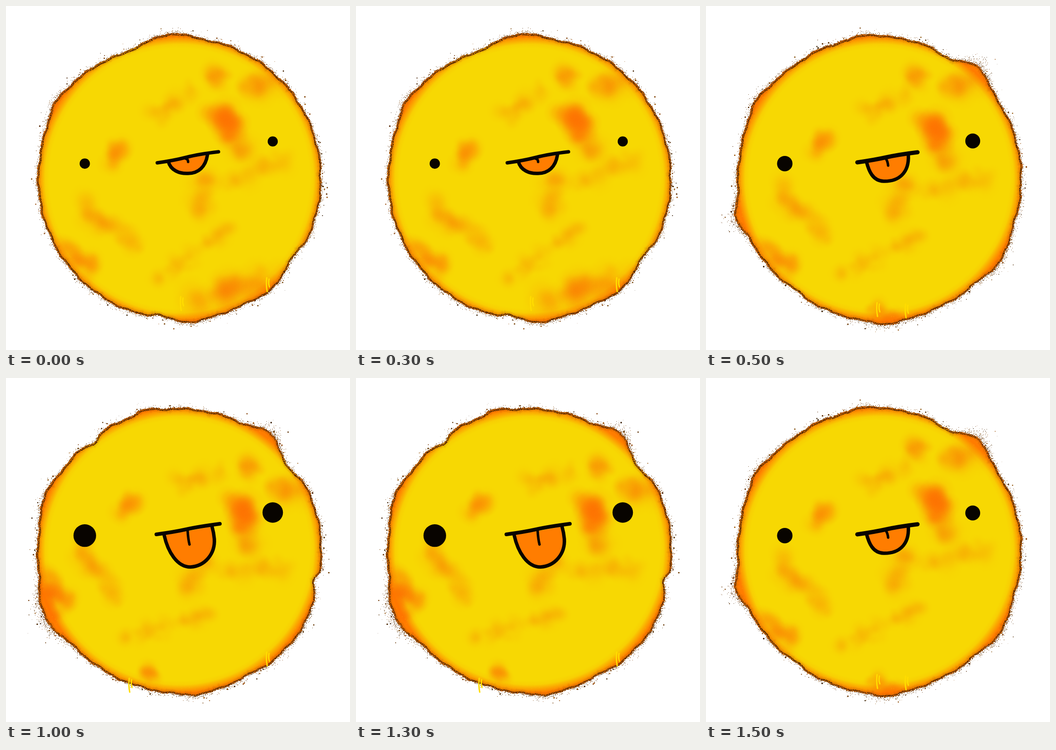
These frames come from a looping animation (748x748 px, 2000 ms). An HTML page with a canvas:

```html
<!DOCTYPE html>
<html lang="en">
<head>
<meta charset="utf-8">
<title>Sun face</title>
<style>
html, body { margin: 0; width: 100%; height: 100%; overflow: hidden; background: #fff; }
canvas { position: absolute; left: 0; top: 0; width: 748px; height: 748px; animation: 2s step-end infinite; }
#closed { animation-name: closed; }
#half { animation-name: half; }
#open { animation-name: open; }
@keyframes closed { 0% { visibility: visible } 25%, 100% { visibility: hidden } }
@keyframes half { 0%, 50% { visibility: hidden } 25%, 75%, 100% { visibility: visible } }
@keyframes open { 0%, 75%, 100% { visibility: hidden } 50% { visibility: visible } }
</style>
</head>
<body>
<canvas id="closed" width="748" height="748"></canvas>
<canvas id="half" width="748" height="748"></canvas>
<canvas id="open" width="748" height="748"></canvas>
<script>
const CX = 377, CY = 375, SIZE = 748, TAU = Math.PI * 2, RAD = Math.PI / 180;
const INK = '#080400', ORANGE = '#ff7d00';

// Smears run from one point to another: x0, y0, x1, y1, width, strength.
const surface = [
  [455, 244, 492, 254, 44, .9],
  [232, 326, 238, 302, 36, .42],
  [322, 242, 402, 182, 30, .2],
  [155, 432, 285, 515, 34, .27],
  [440, 365, 415, 465, 36, .23],
  [482, 485, 325, 595, 30, .2],
  [600, 328, 485, 385, 34, .18],
  [490, 265, 525, 330, 36, .2]
];
const border = [
  [448, 160, 470, 148, 32, .3],
  [525, 185, 575, 160, 40, .3],
  [125, 520, 185, 575, 34, .4]
];

// Bumps on the round edge: angle in degrees, height, width in degrees.
const poses = [
  {
    id: 'closed', seed: 11, turn: 0, rim: 0, radius: 309,
    bumps: [[37, -10, 5], [48, 6, 7], [84, 6, 5], [99, -8, 3], [212, 9, 7], [246, -9, 7], [267, 8, 5]],
    smears: [[395, 645, 590, 590, 42, .38]],
    drips: [[567, 591], [380, 632]],
    eyes: [11.2, 11],
    lip: 'M329 341Q365 336 392 329T462 317', lipWidth: 7.5,
    bowl: 'M353 338C358 358 378 365 396 364C418 364 434 350 438 324',
    tooth: 'M391 332Q396 333 396 339'
  },
  {
    id: 'half', seed: 23, turn: 10, rim: 0, radius: 310,
    bumps: [[34, 10, 6], [87, 8, 7], [127, -5, 6], [164, 15, 5], [212, 9, 7], [265, 6, 4], [299, -7, 6], [312, 17, 5]],
    smears: [[365, 660, 405, 682, 28, .5]],
    drips: [[372, 645], [434, 648]],
    eyes: [16.8, 16.2],
    lip: 'M329 340Q365 335 392 329T460 318', lipWidth: 9,
    bowl: 'M349 339C354 358 362 380 386 381C418 382 442 364 440 324',
    tooth: 'M391 332Q395 337 396 347'
  },
  {
    id: 'open', seed: 37, turn: 20, rim: 20, radius: 310,
    bumps: [[13, -9, 2], [32, 7, 7], [48, 6, 6], [82, 7, 8], [154, 18, 8], [202, 9, 5], [231, -9, 3], [257, 6, 4], [308, 15, 5], [321, -11, 5]],
    smears: [[300, 642, 325, 645, 24, .4], [92, 450, 105, 525, 26, .6]],
    drips: [[567, 596], [268, 653]],
    eyes: [24.6, 22.3],
    lip: 'M327 340Q365 335 392 329T465 317', lipWidth: 8,
    bowl: 'M344 342C352 378 372 411 401 411C433 409 455 382 453 350C452 338 450 330 448 323',
    tooth: 'M395 333Q396 350 399 362'
  }
];

function randomFrom(seed) {
  return () => {
    seed = seed + 0x6d2b79f5 | 0;
    let t = Math.imul(seed ^ seed >>> 15, 1 | seed);
    t = t + Math.imul(t ^ t >>> 7, 61 | t) ^ t;
    return ((t ^ t >>> 14) >>> 0) / 4294967296;
  };
}

const polar = (q, r) => [CX + Math.cos(q * RAD) * r, CY + Math.sin(q * RAD) * r];

function bell(q, [at, , width]) {
  const d = (q - at + 540) % 360 - 180;
  return Math.exp(-d * d / (2 * width * width));
}

function radiusAt(pose, q) {
  const wave = 1.2 * Math.sin(q * RAD * 23 + pose.seed) + .8 * Math.sin(q * RAD * 57);
  return pose.bumps.reduce((r, b) => r + b[1] * bell(q, b), pose.radius + wave);
}

function fade(g, x, y, from, to, rgb, stops) {
  const fill = g.createRadialGradient(x, y, from, x, y, to);
  stops.forEach((a, i) => fill.addColorStop(i / (stops.length - 1), `rgba(${rgb},${a})`));
  g.fillStyle = fill;
  g.fillRect(x - to, y - to, to * 2, to * 2);
}

// Clouds of soft puffs, thicker near the middle of each smear.
function smear(g, list, degrees, seed) {
  const rnd = randomFrom(seed);
  g.save();
  g.translate(CX, CY);
  g.rotate(degrees * RAD);
  g.translate(-CX, -CY);
  for (const [x0, y0, x1, y1, width, strength] of list) {
    const count = 12 + Math.hypot(x1 - x0, y1 - y0) / 5;
    for (let i = 0; i < count; i++) {
      const t = rnd(), q = rnd() * TAU, d = rnd() * width * .75, r = width * (.45 + rnd() * .55);
      const a = strength * .32;
      fade(g, x0 + (x1 - x0) * t + Math.cos(q) * d, y0 + (y1 - y0) * t + Math.sin(q) * d,
        0, r, '255,110,0', [a, a * .72, a * .25, 0]);
    }
  }
  g.restore();
}

function dot(g, x, y, r) {
  g.beginPath();
  g.arc(x, y, r, 0, TAU);
  g.fill();
}

function speckle(g, pose, rnd) {
  const brown = () => `hsl(${26 + rnd() * 8},100%,${10 + rnd() * 20}%)`;
  for (let q = 0; q < 360; q += .36) {
    const r = radiusAt(pose, q);
    const near = pose.bumps.reduce((s, b) => s + Math.max(0, b[1] - 5) / 10 * bell(q, b), 0);
    const place = d => polar(q + (rnd() - .5) * .7, r + d);
    for (let i = 0; i < 10; i++) {
      const [x, y] = place(-4 - Math.log(1 - rnd()) * (2 + near * 3));
      g.fillStyle = brown();
      g.fillRect(Math.round(x), Math.round(y), 1, 1);
    }
    if (rnd() < .18 + near * .3) {
      g.fillStyle = brown();
      dot(g, ...place(3 + rnd() * rnd() * (18 + near * 25)), .4 + rnd() ** 3 * 1.4);
    }
    if (rnd() < .15) {
      g.fillStyle = 'rgba(255,205,0,.6)';
      dot(g, ...place(-6 - rnd() * 14), .6);
    }
  }
}

function body(g, pose, rnd) {
  const shape = new Path2D();
  for (let q = 0; q < 360; q += .36) shape.lineTo(...polar(q, radiusAt(pose, q) + (rnd() - .5) * 2.5));
  shape.closePath();

  g.save();
  g.clip(shape);
  g.fillStyle = ORANGE;
  g.fillRect(0, 0, SIZE, SIZE);
  fade(g, CX, CY, 283, 310, '247,216,3', [1, .9, .45, 0]);
  smear(g, surface, pose.turn, 5);
  smear(g, border, pose.rim, 9);
  smear(g, pose.smears, 0, pose.seed);
  for (let w = 4; w <= 16; w += 4) {
    g.lineWidth = w;
    g.strokeStyle = `rgba(105,48,0,${.9 / w})`;
    g.stroke(shape);
  }
  g.restore();
  speckle(g, pose, rnd);
}

function drips(g, pose) {
  g.lineCap = 'round';
  g.strokeStyle = '#ffdc00';
  g.lineWidth = 3;
  for (const [x, y] of pose.drips) {
    g.stroke(new Path2D(`M${x} ${y}q-2 15 1 30M${x + 5} ${y + 3}q-2 9 1 17`));
  }
}

function face(g, pose) {
  const [left, right] = pose.eyes;
  const line = (d, width) => {
    g.lineWidth = width;
    g.stroke(new Path2D(d));
  };
  g.fillStyle = g.strokeStyle = INK;
  g.lineCap = g.lineJoin = 'round';
  dot(g, 171.3, 342.7, left);
  dot(g, 580, 294.5 - pose.turn * .1, right);
  g.fillStyle = ORANGE;
  g.fill(new Path2D(pose.bowl));
  line(pose.bowl, 7.5);
  line(pose.tooth, 5.5);
  line(pose.lip, pose.lipWidth);
}

for (const pose of poses) {
  const g = document.getElementById(pose.id).getContext('2d');
  body(g, pose, randomFrom(pose.seed));
  drips(g, pose);
  face(g, pose);
}
</script>
</body>
</html>
```
